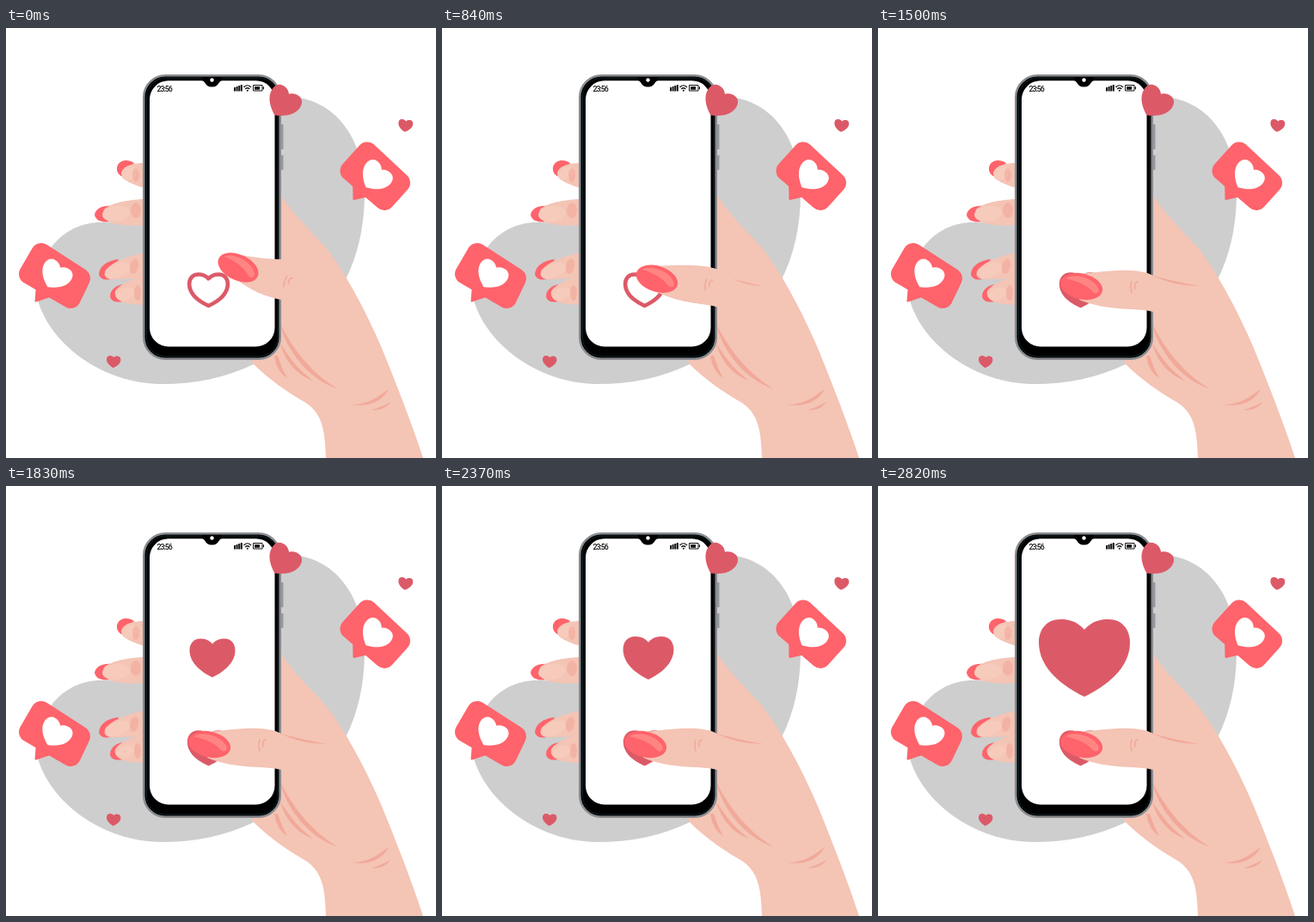
These frames come from a looping animation (500 by 500 pixels, 3.24 s). An HTML page:

```html
<!DOCTYPE html>
<html lang="en">
<head>
<meta charset="utf-8">
<title>Tap to like</title>
<style>
  html, body { margin: 0; width: 100%; height: 100%; overflow: hidden; background: #fff; }
  svg { display: block; width: 100%; height: 100%; }
  .skin { fill: #f4c4b5; }
  .light { fill: #f6cbbc; }
  .fold { fill: #f1a999; }
  .nail { fill: #ff636b; }
  .bubble { fill: #ff636b; stroke: #ff636b; stroke-width: 24; stroke-linejoin: round; }
  .tail { fill: #ff636b; stroke: #ff636b; stroke-width: 2; stroke-linejoin: round; }
  .rose { fill: #dc5a68; }
  .white { fill: #fff; }
  .line { fill: none; stroke: #f1a999; stroke-linecap: round; }
  .clock { font: 500 8.8px Roboto, sans-serif; letter-spacing: -1px; fill: #111; }
</style>
</head>
<body>
<svg viewBox="0 0 500 500">
  <defs>
    <path id="heart" d="M0-33C10-44 20-45 28-45C44-45 53-33 53-18C53 12 25 33 0 45C-25 33-53 12-53-18C-53-33-44-45-28-45C-20-45-10-44 0-33Z"/>
  </defs>

  <path fill="#cecece" d="M315 79C384 76 417 130 417 192C417 230 409 265 395 292L288 391C255 407 220 414 180 414C112 413 50 368 36 313C33 268 64 225 112 226L162 227Z"/>

  <!-- fingers behind the phone -->
  <g>
    <path class="nail" d="M149 157C142 152 131 153 129 162C128 169 134 174 139 173Z"/>
    <path class="skin" d="M162 157C150 157 137 159 134 168C133 176 148 183 162 186Z"/>
    <ellipse class="light" cx="144" cy="169" rx="10" ry="7" transform="rotate(-35 144 169)"/>
    <ellipse class="fold" cx="151" cy="171" rx="4" ry="8" opacity=".6"/>

    <path class="nail" d="M122 207C113 206 104 210 103 217C104 224 113 227 121 225Z"/>
    <path class="skin" d="M162 199C145 199 124 203 115 210C109 217 116 226 128 228C140 230 151 230 162 229Z"/>
    <ellipse class="light" cx="128" cy="216" rx="16" ry="9" transform="rotate(-7 128 216)"/>
    <ellipse class="fold" cx="151" cy="212" rx="6" ry="9" opacity=".6"/>

    <path class="nail" d="M131 269C119 270 109 276 108 286C109 293 118 294 124 291Z"/>
    <path class="skin" d="M162 261C145 264 125 271 116 281C111 290 119 294 131 292L162 291Z"/>
    <ellipse class="light" cx="130" cy="282" rx="15" ry="8" transform="rotate(-22 130 282)"/>
    <ellipse class="fold" cx="149" cy="277" rx="5" ry="9" opacity=".6" transform="rotate(12 149 277)"/>

    <path class="nail" d="M139 298C129 298 121 304 121 312C122 319 131 320 138 317Z"/>
    <path class="skin" d="M162 289C145 292 132 298 127 306C125 315 134 319 145 321L162 322Z"/>
    <ellipse class="light" cx="139" cy="309" rx="11" ry="7" transform="rotate(-18 139 309)"/>
    <ellipse class="fold" cx="153" cy="308" rx="4" ry="9" opacity=".6"/>
  </g>

  <!-- palm and wrist -->
  <path class="skin" d="M316 188C333 218 359 239 374 258C397 288 421 335 436 370C454 414 472 460 485 500H372C371 468 368 449 349 436C330 425 309 412 286 389L300 330Z"/>
  <g class="fold">
    <path d="M318 343C327 376 350 407 386 420C357 402 337 379 318 343Z"/>
    <path d="M319 367C324 386 337 403 357 410C341 398 331 386 319 367Z"/>
    <path d="M312 381C314 394 319 402 327 407C322 399 319 390 316 381Z"/>
    <path d="M402 438C417 440 435 438 445 420C434 427 425 437 402 438Z"/>
    <path d="M425 444C434 445 442 442 447 435C440 438 434 442 425 444Z"/>
  </g>

  <!-- phone -->
  <path fill="#98999c" d="M319 112h3.5v29h-3.5zM319 148h3.5v17h-3.5z"/>
  <rect x="160.25" y="55.25" width="158.5" height="329.5" rx="25" stroke="#8b8c90" stroke-width="2.5"/>
  <rect x="163.5" y="58" width="152.5" height="324" rx="22" fill="none" stroke="#10252b"/>
  <rect class="white" x="167" y="61.2" width="145.5" height="309.3" rx="22"/>
  <path d="M228 61.2C232 61 231 68.5 239.5 68.5C248 68.5 247 61 251 61.2V57H228Z"/>
  <circle class="white" cx="239.5" cy="60.5" r="2.2"/>
  <text class="clock" x="175.5" y="73.7">23:56</text>
  <g fill="#111">
    <path d="M265 69h2v4.5h-2zM267.6 68h2v5.5h-2zM270.2 67h2v6.5h-2zM272.8 66h2v7.5h-2z"/>
    <path fill="none" stroke="#111" stroke-width="1.2" d="M276.5 69Q280.8 64.5 285 69M278.3 71Q280.8 68.5 283.3 71"/>
    <circle cx="280.8" cy="72.7" r="1"/>
    <path fill="none" stroke="#111" d="M287.5 66.5h10.5v6.5h-10.5z"/>
    <path d="M289 68h6v3.8h-6zM298.8 68.3h1.2v3h-1.2z"/>
  </g>

  <!-- floating likes -->
  <path class="bubble" d="M41 262L86 291L75 314L27 286Z"/>
  <path class="tail" d="M36 299L34.5 317.5L54 311Z"/>
  <use class="white" href="#heart" transform="translate(57 288.2) rotate(33) scale(.345)"/>
  <path class="bubble" d="M420 144.5L458 180L440 200L400.5 166Z"/>
  <path class="tail" d="M404 176L404.5 199L426 194Z"/>
  <use class="white" href="#heart" transform="translate(429 173.5) rotate(42) scale(.35)"/>
  <use class="rose" href="#heart" transform="translate(322 87.2) rotate(34) scale(.367 .38)"/>
  <use class="rose" href="#heart" transform="translate(464.5 113.7) rotate(6) scale(.16)"/>
  <use class="rose" href="#heart" transform="translate(125 388.2) rotate(4) scale(.155)"/>

  <!-- like button, result and thumb -->
  <g transform="translate(235.5 304.8) scale(.422 .405)">
    <use id="fill" class="rose" href="#heart"/>
    <use href="#heart" fill="none" stroke="#dc5a68" stroke-width="11" stroke-linejoin="round"/>
  </g>
  <use id="big" class="rose" href="#heart"/>
  <path id="thumb" class="skin"/>
  <path id="crease" class="fold"/>
  <path id="knuckle" class="line" stroke-width="1.5" d="M-3-6C-5-1-4 3-3 7M4-6C1-5 0-2 1 2"/>
  <g id="nail">
    <ellipse class="nail" rx="25" ry="15"/>
    <path fill="#ff8583" d="M-20-5C-12-14 12-13 20-2C23 3 18 6 14 3C4-4-8-5-20-5Z"/>
  </g>
</svg>
<script>
  const LOOP = 3240, STEP = 30;
  const $ = id => document.getElementById(id);
  const set = (id, name, value) => $(id).setAttribute(name, value);
  const mix = (a, b, p) => a + (b - a) * p;
  const ramp = (t, from, to) => Math.min(1, Math.max(0, (t - from) / (to - from)));

  // Each pose: top edge, base inside the palm, bottom edge.
  const raised = [262,263, 282,265, 302,269, 320,269, 330,270, 330,318, 320,316, 302,312, 286,307, 262,288];
  const pressed = [235,286, 262,283, 302,277, 320,288, 330,290, 330,332, 320,330, 303,325, 268,330, 234,316];

  function thumbPath(p) {
    const v = raised.map((a, i) => mix(a, pressed[i], p));
    const pts = (from, to) => v.slice(from * 2, to * 2).join(' ');
    return `M${pts(0, 1)}C${pts(1, 4)}L${pts(4, 7)}C${pts(7, 10)}Z`;
  }

  function heartScale(t) {
    if (t < 2250) return ramp(t, 1710, 1950);
    return t < 2520 ? 1 - ramp(t, 2250, 2520) : ramp(t, 2520, 2820);
  }

  function draw(now) {
    const t = Math.floor((now % LOOP) / STEP) * STEP;
    const p = ramp(t, 300, 1200);
    const x = mix(368, 318, p), y = mix(297.5, 287.5, p), w = 373 - x;

    set('thumb', 'd', thumbPath(p));
    set('nail', 'transform', `translate(${mix(270, 236.5, p)} ${mix(278.5, 300.5, p)}) rotate(${mix(25, 13, p)})`);
    set('knuckle', 'transform', `translate(${mix(328, 298, p)} ${mix(295, 301, p)}) rotate(${mix(18, 0, p)})`);
    set('crease', 'd', `M${x} ${y}Q${x + w * .45} ${y + 6 * p + 1} 373 300Q${x + w * .5} ${y + 11 * p + 2} ${x} ${y}Z`);
    set('fill', 'opacity', ramp(t, 1200, 1500));
    set('big', 'transform', `translate(240 200) scale(${heartScale(t)})`);
  }

  function tick(now) {
    draw(now);
    requestAnimationFrame(tick);
  }
  draw(0);
  requestAnimationFrame(tick);
</script>
</body>
</html>
```
